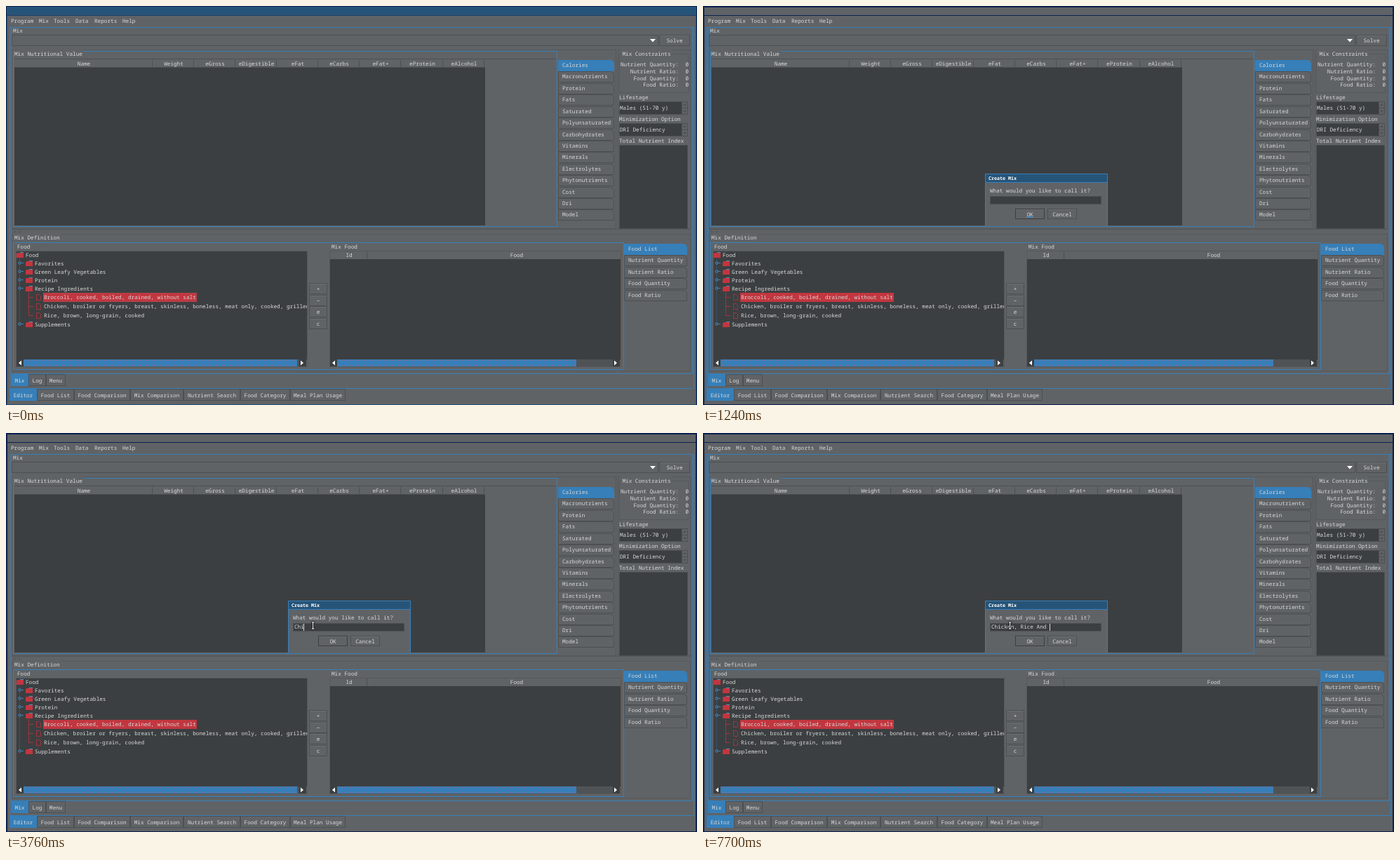
An HTML page with a canvas that plays this animation: 985 by 569 pixels, repeating every 8 s.

```html
<!DOCTYPE html>
<html lang="en">
<head>
<meta charset="utf-8">
<title>Mix editor</title>
<style>
html, body { margin: 0; width: 100%; height: 100%; overflow: hidden; background: #606366; }
canvas { display: block; }
</style>
</head>
<body>
<canvas id="stage" width="985" height="569"></canvas>
<script>
const ctx = document.getElementById('stage').getContext('2d');
const PANEL = '#606366', DARK = '#3c3f41', EDGE = '#4d5053', LIGHT = '#6b6f72', FAINT = '#56595c';
const BLUE = '#367fb9', TITLE = '#265478', RED = '#c2363f', NAVY = '#0c2050', TEXT = '#d8d8d8';
const CHAR = 4.62, LOOP = 8000;

function fill(x, y, w, h, color) {
  ctx.fillStyle = color;
  ctx.fillRect(x, y, w, h);
}
function frame(x, y, w, h, color = EDGE) {
  ctx.strokeStyle = color;
  ctx.lineWidth = 1;
  ctx.strokeRect(x + .5, y + .5, w - 1, h - 1);
}
// y is the middle of the capitals
function text(s, x, y, align = 'left', color = TEXT, font = '300 7.7px') {
  ctx.font = font + ' "Noto Sans Mono", monospace';
  ctx.textAlign = align;
  ctx.fillStyle = color;
  ctx.fillText(s, x, y + 3);
}
function poly(points, color) {
  ctx.fillStyle = color;
  ctx.beginPath();
  for (let i = 0; i < points.length; i += 2) ctx.lineTo(points[i], points[i + 1]);
  ctx.fill();
}
function button(label, x, y, w, h) {
  fill(x, y, w, h, PANEL);
  frame(x, y, w, h);
  fill(x + 1, y + 1, w - 2, 1, LIGHT);
  text(label, x + w / 2, y + h / 2, 'center');
}

function sideTabs(labels, x, y, w) {
  labels.forEach((label, i) => {
    const top = Math.round(y + i * 16.42);
    ctx.beginPath();
    ctx.roundRect(x + .5, top + .5, w - 1, 15, [0, 5, 0, 0]);
    ctx.fillStyle = i ? PANEL : BLUE;
    ctx.fill();
    ctx.strokeStyle = i ? EDGE : BLUE;
    ctx.stroke();
    text(label, x + 6, top + 7);
  });
}
function bottomTabs(labels, edges, y) {
  labels.forEach((label, i) => {
    const x = edges[i], w = edges[i + 1] - x;
    fill(x, y, w, 17, i ? PANEL : BLUE);
    if (i) frame(x, y, w, 17);
    text(label, x + w / 2, y + 8.5, 'center');
  });
}
function scrollbar(x, w, thumb) {
  fill(x, 504, w, 10, '#505356');
  fill(x, 504, 10, 10, DARK);
  fill(x + w - 10, 504, 10, 10, DARK);
  poly([x + 3, 509, x + 7, 505.5, x + 7, 512.5], '#fff');
  poly([x + w - 4, 509, x + w - 8, 505.5, x + w - 8, 512.5], '#fff');
  fill(x + 10, 504, thumb, 10, BLUE);
  for (let i = 0; i < thumb - 4; i += 4) {
    fill(x + 12 + i, 505, 2, 1, '#8a6590');
    fill(x + 12 + i, 512, 2, 1, '#8a6590');
  }
}
function spinner(label, y) {
  fill(874, y, 89, 19, DARK);
  frame(874, y, 98, 19);
  frame(963, y, 9, 10);
  frame(963, y + 9, 9, 10);
  poly([965, y + 6, 967.5, y + 3, 970, y + 6], EDGE);
  poly([965, y + 13, 967.5, y + 16, 970, y + 13], EDGE);
  text(label, 875, y + 9);
}

function windowFrame(active) {
  fill(0, 0, 985, 569, PANEL);
  frame(0, 0, 985, 569, NAVY);
  frame(1, 1, 983, 568, active ? TITLE : NAVY);
  fill(2, 2, 981, 11, active ? TITLE : PANEL);
  fill(1, 13, 983, 1, active ? '#1d3f63' : NAVY);
}
function menuBar(open) {
  if (open) fill(43, 15, 20, 13, BLUE);
  [['Program', 7], ['Mix', 47], ['Tools', 68], ['Data', 99], ['Reports', 126], ['Help', 166]]
    .forEach(([s, x]) => text(s, x, 21));
}
function popup(hover) {
  fill(43, 27, 125, 84, PANEL);
  frame(43, 27, 125, 84);
  if (hover) fill(44, 29, 123, 13, BLUE);
  ['Create', 'Rename', 'Duplicate', 'Delete', 'Import', 'Export']
    .forEach((s, i) => text(s, 51, 36 + i * 13));
}

function topPane() {
  frame(5, 30, 976, 516, BLUE);
  frame(7, 30, 972, 495, BLUE);
  text('Mix', 10, 35);
  frame(8, 41, 922, 16);
  poly([918, 47, 926, 47, 922, 51.5], '#fff');
  button('Solve', 931, 41, 44, 16);

  frame(8, 62, 862, 256, FAINT);
  frame(10, 64, 776, 251, BLUE);
  fill(11, 62, 100, 12, PANEL);
  text('Mix Nutritional Value', 12, 68);
  fill(12, 75, 772, 1, EDGE);
  fill(12, 88, 671, 225, DARK);
  fill(12, 87, 671, 1, EDGE);
  const edges = [12, 209, 268, 327, 386, 445, 504, 563, 623, 682];
  ['Name', 'Weight', 'eGross', 'eDigestible', 'eFat', 'eCarbs', 'eFat+', 'eProtein', 'eAlcohol']
    .forEach((s, i) => {
      text(s, (edges[i] + edges[i + 1]) / 2 + .5, 82, 'center');
      fill(edges[i + 1] - 1, 77, 1, 11, EDGE);
    });
  sideTabs(['Calories', 'Macronutrients', 'Protein', 'Fats', 'Saturated', 'Polyunsaturated',
    'Carbohydrates', 'Vitamins', 'Minerals', 'Electrolytes', 'Phytonutrients', 'Cost', 'Dri', 'Model'],
    787, 77, 80);
}
function sidebar() {
  frame(872, 62, 104, 256, FAINT);
  frame(874, 68, 99, 56, FAINT);
  fill(877, 62, 72, 12, PANEL);
  text('Mix Constraints', 913, 68, 'center');
  ['Nutrient Quantity:', 'Nutrient Ratio:', 'Food Quantity:', 'Food Ratio:'].forEach((s, i) => {
    const y = 83 + Math.round(i * 9.8);
    text(s, 959, y, 'right');
    text('0', 973, y, 'right');
  });
  text('Lifestage', 874, 130);
  spinner('Males (51-70 y)', 136);
  text('Minimization Option', 874, 161);
  spinner('DRI Deficiency', 167);
  text('Total Nutrient Index', 874, 192);
  fill(874, 198, 98, 120, DARK);
  frame(874, 198, 98, 120);
}

function folder(x, y) {
  fill(x + 1, y - 3, 9, 1, RED);
  fill(x, y - 2, 10, 6, RED);
  fill(x + 5, y - 4, 5, 1, '#4f8fc0');
}
function tree(focused) {
  fill(15, 349, 414, 155, DARK);
  frame(14, 349, 416, 166, FAINT);
  ctx.save();
  ctx.beginPath();
  ctx.rect(15, 349, 414, 155);
  ctx.clip();
  folder(15, 355);
  text('Food', 28, 355);
  fill(19, 360, 1, 94, '#36526a');
  [['Favorites', 367], ['Green Leafy Vegetables', 379], ['Protein', 391],
    ['Recipe Ingredients', 403], ['Supplements', 454]].forEach(([s, y]) => {
    fill(21, y - 1, 4, 1, BLUE);
    ctx.beginPath();
    ctx.arc(19.5, y - .5, 1.7, 0, 7);
    ctx.fillStyle = DARK;
    ctx.fill();
    ctx.strokeStyle = '#4b96d0';
    ctx.stroke();
    folder(28, y);
    text(s, 41, y);
  });
  fill(32, 408, 1, 34, '#a5333b');
  fill(53, 409, 219, 13, RED);
  if (focused) frame(53, 409, 219, 13, '#b0464f');
  ['Broccoli, cooked, boiled, drained, without salt',
    'Chicken, broiler or fryers, breast, skinless, boneless, meat only, cooked, grilled',
    'Rice, brown, long-grain, cooked'].forEach((s, i) => {
    const y = 415 + i * 13;
    fill(33, y, 6, 1, '#a5333b');
    ctx.strokeStyle = '#a5333b';
    ctx.beginPath();
    ctx.moveTo(47.5, y - 3.5);
    ctx.lineTo(43.5, y - 3.5);
    ctx.lineTo(43.5, y + 4.5);
    ctx.lineTo(49.5, y + 4.5);
    ctx.lineTo(49.5, y - 1.5);
    ctx.closePath();
    ctx.stroke();
    text(s, 54, y);
  });
  ctx.restore();
  scrollbar(15, 413, 390);
}
function bottomPane(focused) {
  fill(8, 318, 968, 1, FAINT);
  fill(8, 325, 968, 1, FAINT);
  poly([10, 323, 12.5, 320, 15, 323], FAINT);
  poly([17, 321, 22, 321, 19.5, 324], FAINT);
  frame(8, 325, 968, 196, FAINT);
  frame(10, 337, 871, 182, BLUE);
  fill(10, 325, 68, 11, PANEL);
  text('Mix Definition', 12, 330);
  text('Food', 16, 343);
  tree(focused);
  ['+', '\u2212', 'e', 'c'].forEach((s, i) => button(s, 432, 395 + Math.round(i * 16.6), 26, 16));

  text('Mix Food', 464, 343);
  frame(461, 349, 416, 166, FAINT);
  text('Id', 489, 355, 'center');
  text('Food', 728, 355, 'center');
  fill(514, 350, 1, 11, EDGE);
  fill(462, 361, 414, 143, DARK);
  scrollbar(462, 413, 341);
  sideTabs(['Food List', 'Nutrient Quantity', 'Nutrient Ratio', 'Food Quantity', 'Food Ratio'],
    881, 339, 90);

  bottomTabs(['Mix', 'Log', 'Menu'], [7, 32, 57, 85], 525);
  bottomTabs(['Editor', 'Food List', 'Food Comparison', 'Mix Comparison', 'Nutrient Search',
    'Food Category', 'Meal Plan Usage'], [5, 44, 97, 177, 253, 334, 405, 484], 546);
}

const NAME = 'Chicken, Rice And ';
const KEYS = [3100, 3620, 3760, 4270, 4380, 4530, 4840, 5120, 5240,
  5830, 6090, 6160, 6460, 6910, 7280, 7500, 7550, 7700];
const CLICK = 2090;

function dialog(t) {
  fill(402, 239, 175, 75, PANEL);
  frame(402, 239, 175, 76, BLUE);
  fill(403, 240, 173, 11, TITLE);
  fill(403, 251, 173, 1, BLUE);
  text('Create Mix', 407, 245, 'left', '#fff', 'bold 6.7px');
  text('What would you like to call it?', 409, 263);
  fill(410, 271, 158, 12, DARK);
  frame(409, 271, 159, 12);
  button('OK', 445, 289, 42, 15);
  frame(445, 289, 42, 15, DARK);
  button('Cancel', 491, 289, 42, 15);
  if (t < CLICK) {
    for (let x = 460; x < 472; x += 2) fill(x, 301, 1, 1, '#4b9ade');
    fill(462, 300, 8, 1, BLUE);
  }
  const count = KEYS.filter(k => k <= t).length;
  text(NAME.slice(0, count), 411, 276);
  // the caret blinks anew after each key
  const last = count ? KEYS[count - 1] : CLICK;
  const blink = count === 1 ? 440 : 490;
  if (t >= CLICK && t - last < (count ? blink : 500))
    fill(Math.floor(411 + count * CHAR), 272, 1, 10, TEXT);
}

function arrow(x, y) {
  const shape = [x, y, x, y + 11, x + 2.6, y + 8.6, x + 4.6, y + 12.5,
    x + 6, y + 11.8, x + 4.2, y + 8, x + 7.6, y + 8];
  poly(shape, '#fff');
  ctx.strokeStyle = '#101820';
  ctx.lineWidth = .8;
  ctx.closePath();
  ctx.stroke();
}
function beam(x, y) {
  const parts = [[-2, -5, 4, 1], [-2, 4, 4, 1], [-.5, -5, 1, 10]];
  parts.forEach(([dx, dy, w, h]) => fill(x + dx - .8, y + dy - .8, w + 1.6, h + 1.6, '#12161c'));
  parts.forEach(([dx, dy, w, h]) => fill(x + dx, y + dy, w, h, '#fff'));
}
function pointer(t) {
  const p = Math.min(1, (t - 1580) / 500), ease = p * p * (3 - 2 * p);
  const settle = t >= 2270 ? .6 : 0;
  const x = 401 + 36 * ease + settle, y = 258 + 16 * ease + settle;
  if (y > 271 && x > 410) beam(x, y);
  else arrow(x, y);
}

function draw() {
  const t = performance.now() % LOOP;
  const menu = t >= 500 && t < 1180, asking = t >= 1240;
  ctx.textRendering = 'geometricPrecision';
  windowFrame(!asking);
  topPane();
  sidebar();
  bottomPane(!menu && !asking);
  menuBar(menu);
  if (menu) popup(t >= 730);
  if (asking) dialog(t);
  if (t >= 1580) pointer(t);
  requestAnimationFrame(draw);
}
draw();
</script>
</body>
</html>
```
